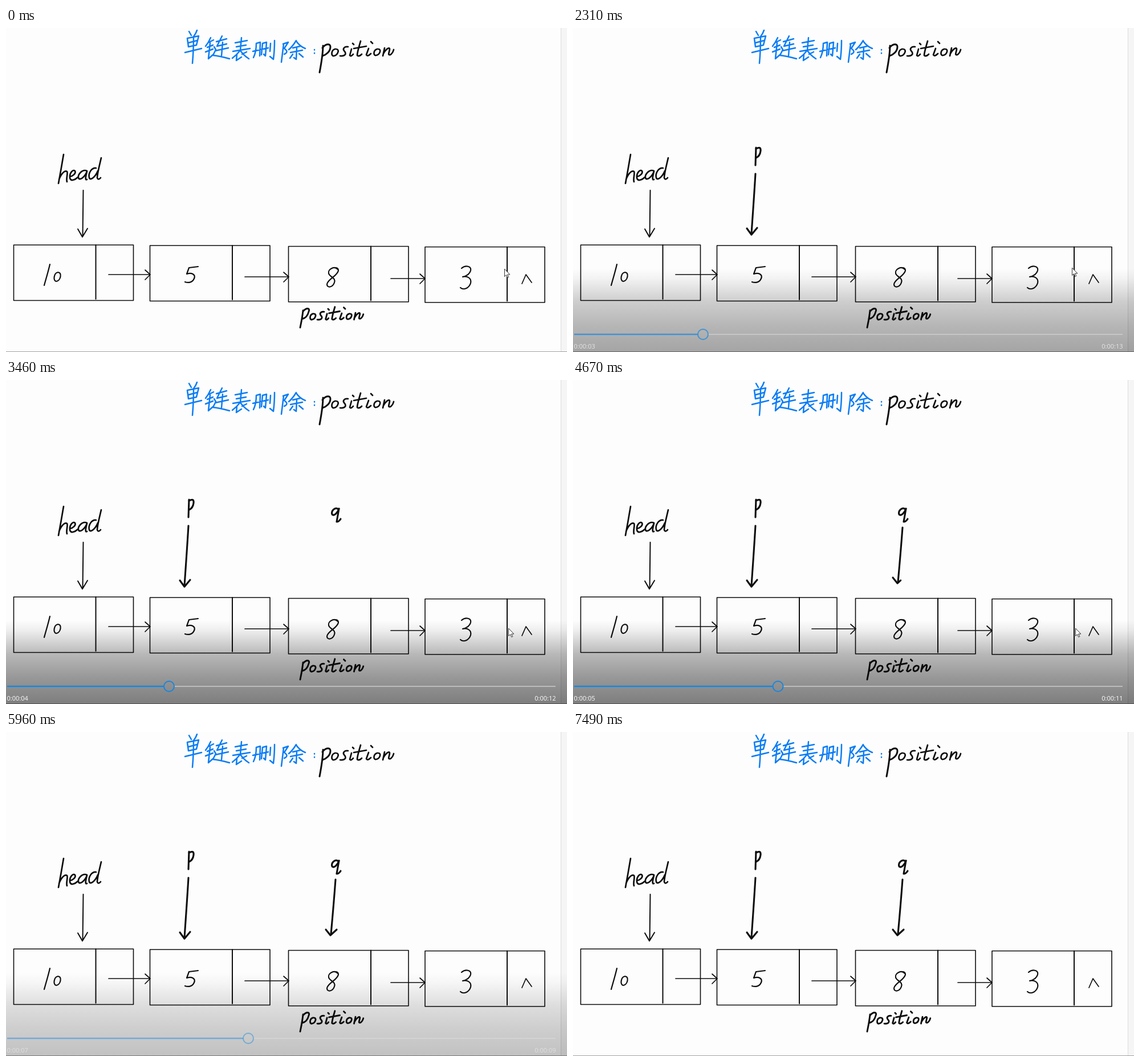
Recreate the animation shown at these times as an HTML page with a canvas. Size 984 by 569 pixels, loop 8000 ms.

```html
<!DOCTYPE html>
<html lang="zh">
<head>
<meta charset="utf-8">
<title>Linked list deletion</title>
<style>
html, body { margin: 0; width: 100%; height: 100%; overflow: hidden; background: #fdfdfd; }
canvas { display: block; width: 984px; height: 569px; }
</style>
</head>
<body>
<canvas id="stage" width="984" height="569"></canvas>
<script>
const W = 984, H = 569, LOOP = 8000, TICK = 128;
const INK = '#0d0d0d', BLUE = '#0a7cf5', PLAYER = '#1787e0';
const ctx = document.getElementById('stage').getContext('2d');

const titleStrokes = [
  // 单
  'M321 6L325 13M335 4Q333 10 329 15M318 18L320 33M318 18L338 14L334 30M320 26L335 22M320 33L334 30M314 43L343 36M329 15Q329 40 327 62',
  // 链
  'M359 17Q355 26 350 32M356 25L364 21M353 34L363 30M350 42L363 37M358 26L355 54L364 46M369 24L387 19M379 14L370 32L387 28M367 40L390 35M380 25L378 49M365 33L368 38L363 48Q374 49 392 54',
  // 表
  'M402 26L423 22M404 33L421 30M398 41L428 36M413 17L411 39Q405 47 397 53M405 46L404 57L413 51M422 42L414 46M412 41Q418 49 426 54',
  // 删
  'M439 27Q439 42 434 52M439 27L446 25L445 49M450 27L448 47M450 27L457 25L455 49L452 46M433 41L460 35M464 27L463 41M471 22Q471 40 469 55L463 50',
  // 除 and colon
  'M486 28L495 25L488 36Q497 42 488 46M487 28L483 60M509 22Q503 32 496 38M509 23Q515 32 525 36M503 35L516 32M499 43L520 39M510 34L509 55L505 52M503 46L498 53M514 45L521 51M541 38V38.5M541 44V44.5'
];

const osition =
  'M577 37C570 39 570 50 575 49C582 48 586 37 579 37' +
  'M600 33C594 32 590 36 593 40C598 45 595 50 586 49' +
  'M606 37L603 48Q605 51 609 46M608 27L610 29' +
  'M622 23C619 33 616 43 616 48Q619 51 624 46M610 36L632 32' +
  'M636 36L632 47Q634 51 640 45M640 24L643 27' +
  'M651 37C644 39 644 49 649 48C656 47 659 37 653 37' +
  'M664 35L661 49M662 45C667 36 673 33 673 37C672 44 669 48 674 47Q678 45 680 38';
const titleP = 'M556 31C556 45 553 62 550 78M555 35C561 27 569 27 569 33C569 41 562 47 555 49';
const labelP = 'M521 496C520 507 518 516 516 526M521 498C526 491 534 491 531 498C529 506 525 510 519 511';

const head =
  'M101 222C98 240 95 257 92 273M93 266C97 256 103 249 107 252C109 255 105 265 107 270' +
  'M112 261C118 260 123 255 121 251C117 247 111 256 112 263C113 270 121 267 126 262' +
  'M142 251C134 247 126 257 127 263C129 269 138 262 142 252C140 260 138 268 142 266' +
  'M158 246C150 245 144 255 146 263C148 269 157 261 161 251M167 228C164 241 160 256 160 263Q162 268 166 263';

const digits =
  'M77 415C74 428 70 441 67 452M91 429C84 430 82 444 88 445C96 444 99 429 91 429' +
  'M337 419L321 421L317 432C326 429 333 433 330 440C327 447 320 448 314 446' +
  'M582 424C576 417 564 424 566 431C568 438 579 438 576 447C573 456 563 457 563 450C564 441 581 436 583 426Q583 422 579 421' +
  'M799 422C806 416 817 418 815 426C813 433 806 436 801 437C810 435 817 440 815 448C812 457 803 461 797 456';

const cursorShape = new Path2D('M0 0V13L3 10.2L5.3 15L7.3 14L5 9.5H9Z');

// Strokes written live: path, start, end, approximate length
const written = [
  ['M321 210L320 241', 600, 860, 32],
  ['M321 212Q330 207 329 216Q328 225 321 228', 860, 1270, 36],
  ['M320 256Q318 290 313 361', 1700, 2060, 108],
  ['M305 352L313 363L323 351', 2060, 2300, 32],
  ['M583 227C577 222 570 230 572 236C575 240 582 233 584 226', 2800, 3100, 42],
  ['M584 226L580 249Q584 249 587 244', 3100, 3440, 35],
  ['M578 259Q575 300 570 355', 3800, 4350, 99],
  ['M561 347L569 357L580 347', 4350, 4740, 31]
].map(([d, from, to, len]) => ({ path: new Path2D(d), from, to, len }));

const fadeKeys = [[1920, 0], [2304, 0.7], [2560, 1], [5500, 1], [5632, 0.93], [5888, 0.47], [6016, 0.2], [6144, 0]];
const knobKeys = [[1800, 198], [2304, 228], [3456, 286], [5632, 425]];
const mouseX = [[1800, 874], [2304, 875], [2688, 881]];
const mouseY = [[600, 423], [1270, 419], [1800, 419], [2304, 421], [2688, 436]];

function track(keys, t) {
  if (t <= keys[0][0]) return keys[0][1];
  for (let i = 1; i < keys.length; i++) {
    const [a, u] = keys[i - 1], [b, v] = keys[i];
    if (t <= b) return u + (v - u) * (t - a) / (b - a);
  }
  return keys[keys.length - 1][1];
}

function pen(d, width, color = INK) {
  ctx.strokeStyle = color;
  ctx.lineWidth = width;
  ctx.stroke(typeof d === 'string' ? new Path2D(d) : d);
}

function drawNode(x, y, w, split) {
  pen(`M${x} ${y}H${x + w}V${y + 97.5}H${x}Z`, 1.6);
  pen(`M${split} ${y}V${y + 95}`, 2);
}

function drawLink(x, y, end) {
  pen(`M${x} ${y}H${end}M${end - 9} ${y - 8}L${end} ${y}L${end - 9} ${y + 9}`, 1.7);
}

function drawPage() {
  ctx.fillStyle = '#fdfdfd';
  ctx.fillRect(0, 0, W, H);
  ctx.fillStyle = '#f5f5f5';
  ctx.fillRect(974, 0, 10, H);
  ctx.fillStyle = '#dcdcdc';
  ctx.fillRect(973, 0, 1, H);
  ctx.fillStyle = '#a0a0a0';
  ctx.fillRect(0, 568, W, 1);

  titleStrokes.forEach(d => pen(d, 2.5, BLUE));
  pen(titleP, 3);
  pen(osition, 2.7);
  pen(head, 2.7);
  pen('M135.5 285L134.5 366M126 353L134 367L143 352', 2);

  drawNode(13.5, 381, 210, 157.5);
  drawNode(252.5, 382, 210.5, 397);
  drawNode(495.5, 383.5, 210.5, 640);
  drawNode(735, 384.5, 210, 879);
  drawLink(180, 433, 253);
  drawLink(419, 437, 496);
  drawLink(675, 440, 735);
  pen(digits, 2.2);
  pen('M905 449L912 433L922 447', 1.7);

  pen(labelP, 2.9);
  ctx.save();
  ctx.translate(42, 470);
  ctx.scale(0.86, 0.86);
  pen(osition, 3.3);
  ctx.restore();
}

function drawWriting(t) {
  for (const s of written) {
    const done = (t - s.from) / (s.to - s.from);
    if (done <= 0) continue;
    ctx.setLineDash(done < 1 ? [s.len * done, 999] : []);
    pen(s.path, 3.1);
  }
  ctx.setLineDash([]);
}

function drawPlayer(t) {
  const alpha = track(fadeKeys, t);
  if (alpha <= 0) return;
  const x = track(knobKeys, t);
  const sec = Math.floor(x / 60.25);
  const clock = n => '0:00:' + String(n).padStart(2, '0');

  ctx.save();
  ctx.globalAlpha = alpha;
  const top = 422;
  const shade = ctx.createLinearGradient(0, top, 0, H);
  [[0, 0], [0.12, 0.06], [0.4, 0.27], [0.68, 0.4], [1, 0.5]]
    .forEach(([p, a]) => shade.addColorStop(p, `rgba(0,0,0,${a})`));
  ctx.fillStyle = shade;
  ctx.fillRect(0, top, W, H - top);

  ctx.lineCap = 'butt';
  pen(`M${x + 9} 538H964`, 2, 'rgba(255,255,255,0.4)');
  pen(`M2 538H${x - 9}`, 2.6, PLAYER);
  ctx.beginPath();
  ctx.arc(x, 538, 9, 0, Math.PI * 2);
  ctx.strokeStyle = PLAYER;
  ctx.lineWidth = 2;
  ctx.stroke();

  ctx.fillStyle = '#fff';
  ctx.font = '11px "Open Sans", "Noto Sans", sans-serif';
  ctx.fillText(clock(sec), 1.5, 563);
  ctx.textAlign = 'right';
  ctx.fillText(clock(16 - sec), 964.5, 563);
  ctx.restore();
}

function drawCursor(t) {
  if (t >= 5500) return;
  ctx.save();
  ctx.translate(track(mouseX, t) + 0.5, track(mouseY, t) + 0.5);
  ctx.fillStyle = '#fff';
  ctx.fill(cursorShape);
  pen(cursorShape, 1, '#333');
  ctx.restore();
}

function frame(now) {
  const t = Math.floor(now % LOOP / TICK) * TICK;
  ctx.lineCap = ctx.lineJoin = 'round';
  drawPage();
  drawWriting(t);
  drawPlayer(t);
  drawCursor(t);
  requestAnimationFrame(frame);
}
requestAnimationFrame(frame);
</script>
</body>
</html>
```
